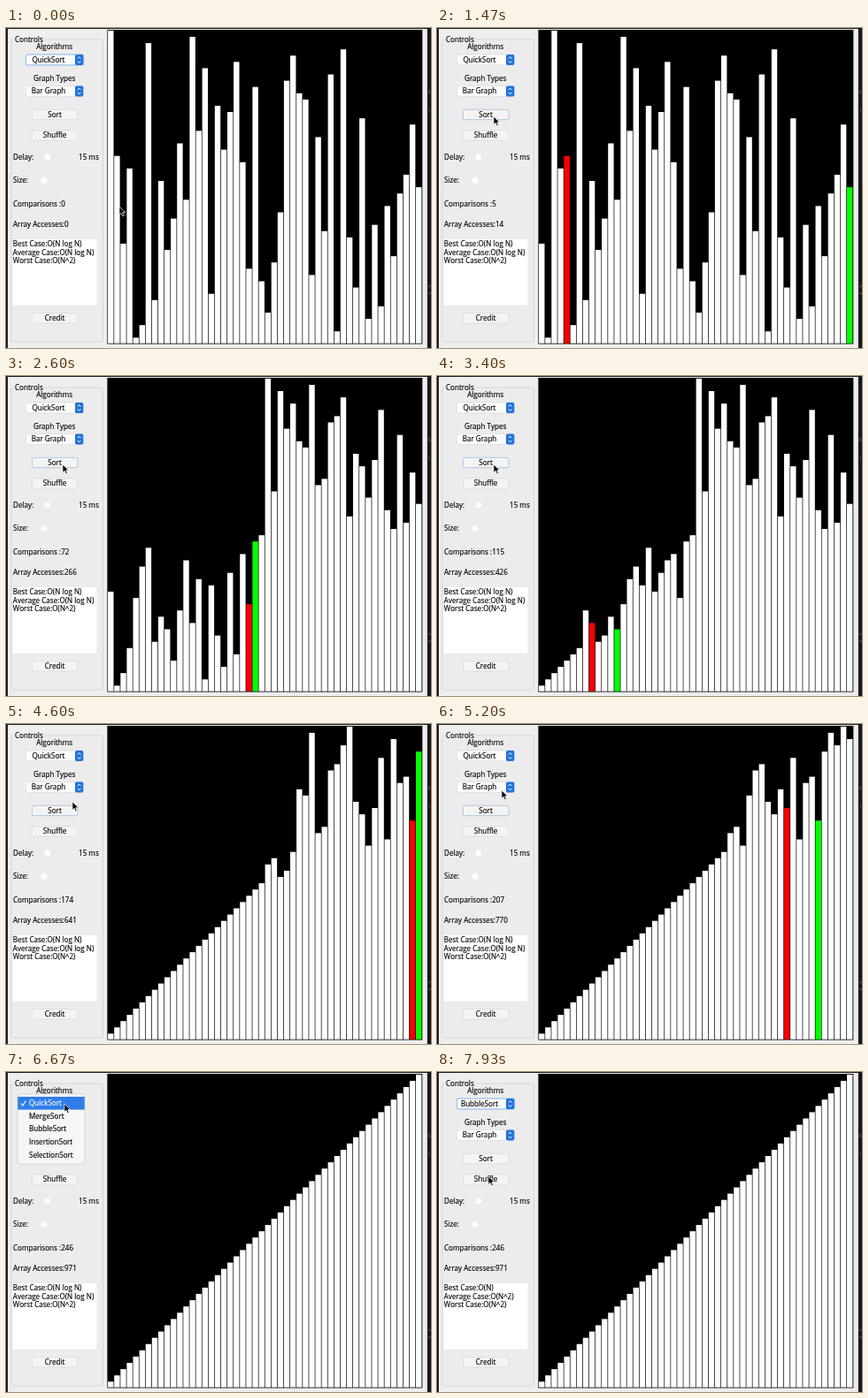
An HTML page for the animation above (8000 ms loop, 480x362 px).

```html
<!DOCTYPE html>
<html lang="en">
<head>
<meta charset="utf-8">
<title>Sorting visualizer</title>
<style>
  html, body { margin: 0; width: 100%; height: 100%; overflow: hidden; background: #17171b; }
  svg { display: block; width: 480px; height: 362px; }
  text { font: 8.1px "Open Sans", "Noto Sans", sans-serif; fill: #000; stroke: #000; stroke-width: .15; }
  .mid { text-anchor: middle; }
  .combo { fill: #fcfcfc; stroke: #d6d6d6; stroke-width: .6; }
  .button { fill: #f4f4f4; stroke: #d4d4d4; stroke-width: .6; }
  .button.focus { stroke: #a6c3de; stroke-width: .9; }
  .combo.focus { stroke: #a9cbee; stroke-width: 1.6; }
  .chevron { fill: none; stroke: #fff; stroke-width: 1; }
  .behind text { font-size: 6px; fill: #777; stroke: none; }
  .picked { fill: #fff; stroke: #fff; }
</style>
</head>
<body>
<svg viewBox="0 0 480 362">
  <defs>
    <g id="arrows">
      <rect x="78" y="-6" width="9.3" height="12" rx="1.8" fill="#2273da"/>
      <path class="chevron" d="M80.8 -1.4l1.8 -2l1.8 2M80.8 1.4l1.8 2l1.8 -2"/>
    </g>
    <circle id="knob" r="4.6" fill="#fbfbfb" stroke="#d8d8d8" stroke-width=".6"/>
  </defs>

  <rect width="480" height="362" fill="#17171b"/>
  <g class="behind">
    <text x="476.6" y="74">S</text>
    <text x="477" y="95">\</text>
    <text x="477" y="294">n</text>
    <text x="477" y="302">n</text>
  </g>
  <rect x="2" y="1" width="473.8" height="361" fill="#eee"/>

  <rect x="6" y="13" width="103.5" height="342" rx="2" fill="#ececec" stroke="#cecece" stroke-width=".8"/>
  <rect x="9" y="9" width="34" height="8" fill="#ededed"/>
  <text x="10" y="16.2">Controls</text>

  <text class="mid" x="54.7" y="24.3">Algorithms</text>
  <rect id="algorithm" class="combo" x="22.5" y="30" width="65" height="12" rx="2.3"/>
  <text id="algorithmName" class="mid" x="48" y="38.7"></text>
  <use href="#arrows" y="36"/>

  <text class="mid" x="54.7" y="60">Graph Types</text>
  <rect class="combo" x="22.5" y="65.5" width="65" height="12" rx="2.3"/>
  <text class="mid" x="48" y="74.2">Bar Graph</text>
  <use href="#arrows" y="71.5"/>

  <rect id="sort" class="button" x="29.5" y="92.3" width="51.5" height="11.4" rx="2"/>
  <text class="mid" x="55" y="100.9">Sort</text>
  <rect class="button" x="29.5" y="115.8" width="51.5" height="11.4" rx="2"/>
  <text class="mid" x="55" y="124.4">Shuffle</text>
  <rect class="button" x="29.5" y="322.6" width="51.5" height="11.4" rx="2"/>
  <text class="mid" x="55" y="331.2">Credit</text>

  <text x="8" y="148.7">Delay:</text>
  <use href="#knob" x="46.7" y="146"/>
  <text x="82" y="148.7">15 ms</text>
  <text x="8" y="175.2">Size:</text>
  <use href="#knob" x="43" y="172.5"/>

  <text id="comparisons" x="8" y="201.8"></text>
  <text id="accesses" x="8" y="225.3"></text>

  <rect x="7.5" y="239" width="95" height="74.5" fill="#fff"/>
  <text id="best" x="7.8" y="247"></text>
  <text id="average" x="7.8" y="256.5"></text>
  <text id="worst" x="7.8" y="266"></text>

  <rect x="114.4" y="2" width="355.9" height="355.5" fill="#000"/>
  <g id="bars"></g>

  <g id="menu"></g>
  <path id="cursor" d="M0 0v9.3l2.2 -2l1.5 3.5l1.6 -.7l-1.5 -3.4h3z" fill="#000" stroke="#fff" stroke-width=".7"/>
</svg>

<script>
const LOOP = 8000, FPS = 15;
const STEPS_PER_FRAME = 4, SORT_FRAME = 21;
const CLICK_SORT = 1270, MENU_OPEN = 6670, MENU_CLOSE = 7530;
const UNIT = 7.09, BAR_STEP = 7.1, BAR_LEFT = 115.1, BASE = 357.4, FLOOR = 356.7;

const START = [
  50, 30, 16, 28, 1, 3, 48, 7, 26, 15, 20, 32, 23, 49, 34, 44, 8, 38, 31, 37, 45, 29, 12, 41, 10,
  5, 13, 21, 42, 46, 40, 39, 11, 33, 18, 43, 2, 47, 17, 9, 36, 4, 19, 6, 22, 14, 24, 27, 35, 25
];
const ITEMS = ["QuickSort", "MergeSort", "BubbleSort", "InsertionSort", "SelectionSort"];
const ITEM_HEIGHT = 14.6;
const POINTER = [
  [70, 128, 202], [330, 66, 108], [730, 66, 108], [1130, 64, 100],
  [4250, 64, 100], [4600, 75, 88], [5000, 73, 75], [5900, 73, 75],
  [6380, 66, 36], [6670, 66, 36], [7000, 62, 66], [7470, 62, 66], [7900, 58, 118]
];

const $ = id => document.getElementById(id);
function add(parent, tag, attributes, content = "") {
  const node = document.createElementNS("http://www.w3.org/2000/svg", tag);
  for (const name in attributes) node.setAttribute(name, attributes[name]);
  node.textContent = content;
  return parent.appendChild(node);
}

// Quicksort with the last item as pivot; one step per comparison and per pivot move.
function traceSort(values) {
  const a = [...values], steps = [{ a: values, comparisons: 0, accesses: 0 }];
  let comparisons = 0, accesses = 0;
  const swap = (i, j) => { [a[i], a[j]] = [a[j], a[i]]; accesses += 4; };
  const record = (current, pivot) => steps.push({ a: [...a], current, pivot, comparisons, accesses });

  function sort(low, high) {
    if (low >= high) return;
    const pivot = a[high];
    let edge = low;
    accesses++;
    for (let j = low; j < high; j++) {
      comparisons++;
      accesses++;
      if (a[j] < pivot) swap(edge++, j);
      record(j, high);
    }
    swap(edge, high);
    record(high - 1, high);
    sort(low, edge - 1);
    sort(edge + 1, high);
  }

  sort(0, a.length - 1);
  steps.push({ a, comparisons, accesses });
  return steps;
}

function pointerAt(time) {
  const next = POINTER.findIndex(p => p[0] > time);
  if (next < 0) return POINTER[POINTER.length - 1].slice(1);
  if (next === 0) return POINTER[0].slice(1);
  const [t0, x0, y0] = POINTER[next - 1], [t1, x1, y1] = POINTER[next];
  const p = (time - t0) / (t1 - t0), ease = p * p * (3 - 2 * p);
  return [x0 + (x1 - x0) * ease, y0 + (y1 - y0) * ease];
}

const steps = traceSort(START);
const bars = START.map((_, i) =>
  add($("bars"), "rect", { x: BAR_LEFT + i * BAR_STEP, width: 6.4 }));

add($("menu"), "rect", { x: 13, y: 25, width: 76, height: 79, rx: 3, fill: "#f6f6f6", stroke: "#c4c4c4", "stroke-width": .6 });
const menuItems = ITEMS.map((name, i) => {
  const y = 28 + i * ITEM_HEIGHT;
  const mark = add($("menu"), "rect", { x: 13.3, y, width: 75.4, height: ITEM_HEIGHT, fill: "#2f7de9" });
  const label = add($("menu"), "text", { x: 26, y: y + 10.2 }, name);
  return { y, mark, label };
});
const check = add($("menu"), "path", { d: "M17 35.5l2 2.5l3.3 -5.5", fill: "none", "stroke-width": 1.1 });

function draw(now) {
  const frame = Math.floor((now % LOOP + 3.4) * FPS / 1000);
  const time = frame * 1000 / FPS + 4;

  const index = (frame - SORT_FRAME) * STEPS_PER_FRAME + 1;
  const step = steps[Math.max(0, Math.min(index, steps.length - 1))];
  bars.forEach((bar, i) => {
    const top = BASE - step.a[i] * UNIT;
    bar.setAttribute("y", top);
    bar.setAttribute("height", FLOOR - top);
    bar.setAttribute("fill", i === step.current ? "#fb0000" : i === step.pivot ? "#00ff00" : "#fff");
  });
  $("comparisons").textContent = "Comparisons :" + step.comparisons;
  $("accesses").textContent = "Array Accesses:" + step.accesses;

  const bubble = time >= MENU_CLOSE;
  $("algorithmName").textContent = bubble ? ITEMS[2] : ITEMS[0];
  $("best").textContent = "Best Case:" + (bubble ? "O(N)" : "O(N log N)");
  $("average").textContent = "Average Case:" + (bubble ? "O(N^2)" : "O(N log N)");
  $("worst").textContent = "Worst Case:O(N^2)";

  const sortFocus = time >= CLICK_SORT && time < MENU_OPEN;
  $("sort").classList.toggle("focus", sortFocus);
  $("algorithm").classList.toggle("focus", !sortFocus);

  const [x, y] = pointerAt(time);
  $("cursor").setAttribute("transform", `translate(${x} ${y})`);

  const open = time >= MENU_OPEN && !bubble;
  $("menu").style.display = open ? "" : "none";
  menuItems.forEach((item, i) => {
    const picked = y >= item.y && y < item.y + ITEM_HEIGHT;
    item.mark.style.display = picked ? "" : "none";
    item.label.classList.toggle("picked", picked);
    if (i === 0) check.setAttribute("stroke", picked ? "#fff" : "#000");
  });
}

const origin = performance.now();
function tick() {
  draw(performance.now() - origin);
  requestAnimationFrame(tick);
}
tick();
</script>
</body>
</html>
```
